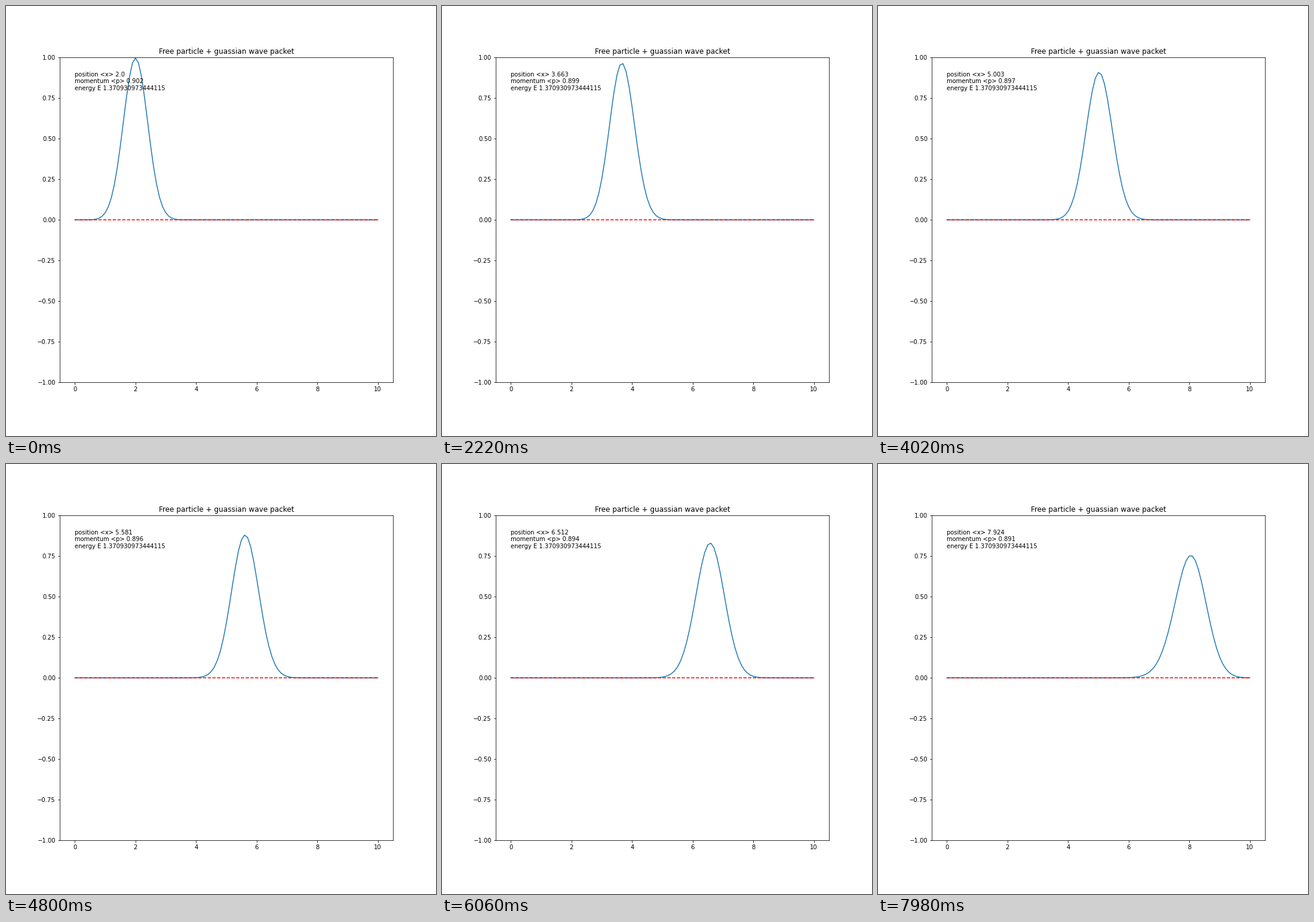
Write a matplotlib script that moves like this. It is 720 px wide and 720 px high and loops after 8 s.

```python
import numpy as np
import matplotlib.pyplot as plt
from matplotlib.animation import FuncAnimation

LOOP_MS = 8000
TICK_MS = 20
HOLD = 3                  # ticks per simulation step
DX = 0.1
TAU = 0.083634 * 0.060    # simulated time per step
LOSS = 0.00152 * 0.060    # norm lost per step
START, SIGMA, K0 = 2.0, 0.4, 20.0
ENERGY = "1.370930973444115"

x = np.linspace(0, 10, 101)

# Free particle on a lattice, solved in the eigenbasis of the Hamiltonian
hop = np.full(x.size - 1, -0.5)
H = (np.eye(x.size) + np.diag(hop, 1) + np.diag(hop, -1)) / DX**2
levels, modes = np.linalg.eigh(H)

psi0 = np.exp(-(x - START)**2 / (4 * SIGMA**2) + 1j * K0 * x)
psi0 /= np.sqrt(np.sum(np.abs(psi0)**2) * DX)
coeffs = modes.T @ psi0


def state(step):
    psi = modes @ (coeffs * np.exp(-1j * levels * TAU * step))
    psi *= np.sqrt(1 - LOSS * step)
    density = np.abs(psi)**2
    position = np.sum(x * density) * DX
    momentum = np.sum(np.imag(np.conj(psi[:-1]) * psi[1:])) * DX
    return density, position, momentum


def caption(position, momentum):
    return (f"position <x> {round(float(position), 3)}\n"
            f"momentum <p> {round(float(momentum), 3)}\n"
            f"energy E {ENERGY}")


fig, ax = plt.subplots(figsize=(10, 10), dpi=72)
fig.subplots_adjust(left=0.125, right=0.9, bottom=0.125, top=0.88)
ax.set_title("Free particle + guassian wave packet")
ax.set_xlim(-0.5, 10.5)
ax.set_ylim(-1, 1)

wave, = ax.plot(x, np.zeros_like(x))
ax.plot(x, np.zeros_like(x), "r--")
label = ax.text(0, 0.8, "")


def update(tick):
    density, position, momentum = state(tick // HOLD)
    wave.set_ydata(density)
    label.set_text(caption(position, momentum))
    return wave, label


anim = FuncAnimation(fig, update, frames=LOOP_MS // TICK_MS,
                     interval=TICK_MS, repeat=True, repeat_delay=0)
plt.show()
```
